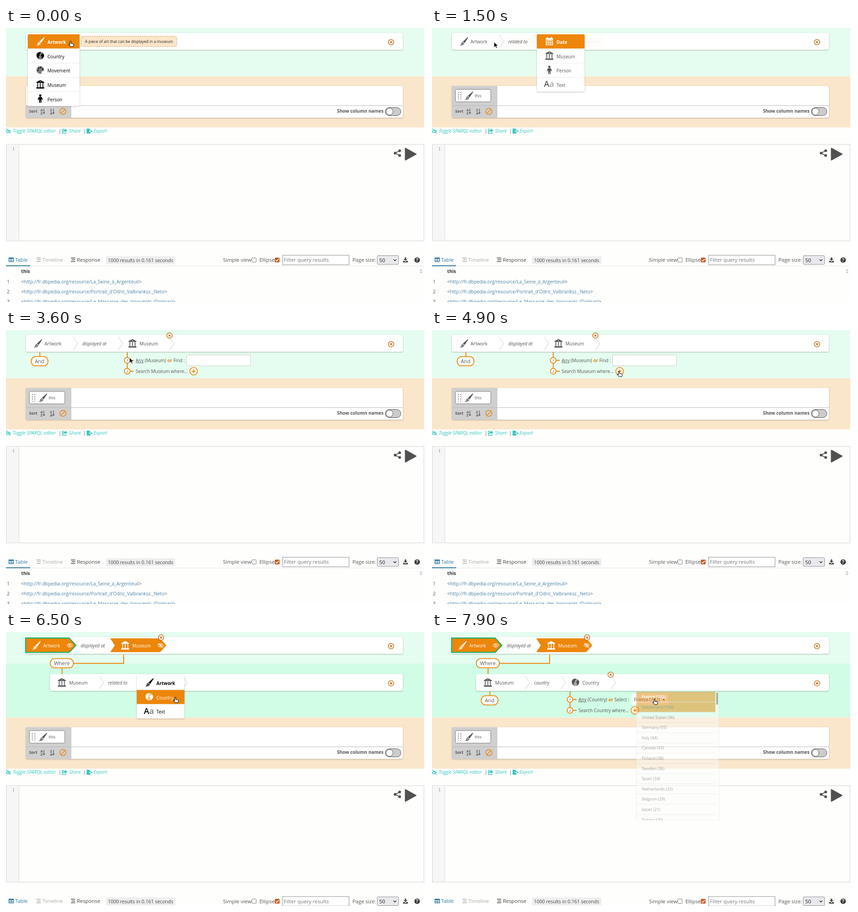
An HTML page that plays this animation: 925x605 px, repeating every 8 s.

```html
<!DOCTYPE html>
<html lang="en">
<head>
<meta charset="utf-8">
<title>Visual query builder</title>
<style>
html, body { margin: 0; width: 100%; height: 100%; overflow: hidden; background: #fefefd; }
svg { display: block; width: 925px; height: 605px; font-family: "Open Sans", sans-serif; }
.card { fill: #fff; filter: drop-shadow(0 1px 1.5px #0004); }
.mono { font-family: "DejaVu Sans Mono", monospace; }
</style>
</head>
<body>
<svg id="stage" viewBox="0 0 925 605"></svg>
<script>
const LOOP = 8000, STEP = 100;
const ORANGE = '#ed860b', GREEN = '#1fb36c', GRAY = '#555';

const text = (x, y, s, size = 10, fill = GRAY, extra = '') =>
  `<text x="${x}" y="${y}" font-size="${size}" fill="${fill}" ${extra}>${s}</text>`;
const bold = 'font-weight="700"', italic = 'font-style="italic"';
const rect = (x, y, w, h, fill, extra = '') =>
  `<rect x="${x}" y="${y}" width="${w}" height="${h}" fill="${fill}" ${extra}/>`;
const path = (d, fill, extra = '') => `<path d="${d}" fill="${fill}" ${extra}/>`;
const line = (d, color, width = 1) => path(d, 'none', `stroke="${color}" stroke-width="${width}"`);
const circle = (x, y, r, fill, extra = '') => `<circle cx="${x}" cy="${y}" r="${r}" fill="${fill}" ${extra}/>`;
const stroke = (color, width = 1) => `stroke="${color}" stroke-width="${width}"`;
const group = (x, y, body, extra = '') => `<g transform="translate(${x} ${y})" ${extra}>${body}</g>`;
const fade = (opacity, body) => opacity > 0 ? `<g opacity="${opacity}">${body}</g>` : '';
const card = (x, y, w, h) => rect(x, y, w, h, '#fff', 'class="card" rx="3"');

// Two-tone icons, centred on the origin
const icons = {
  brush: c => path('M9 -9.5L9.5 -8 2 3.5 -2 .5Z', c) +
    path('M-3 1L1.5 4.3C1 8 -4 9.8 -9 9 -5 7.5 -7 3 -3 1Z', c, 'opacity=".7"'),
  museum: c => path('M0 -9.5L8.7 -5V-3.5H-8.7V-5ZM-8.7 6.5H8.7V9.3H-8.7Z', c) +
    path('M-7 -3.5h2.6V6.5h-2.6ZM-1.3 -3.5h2.6V6.5h-2.6ZM4.4 -3.5h2.6V6.5h-2.6Z', c, 'opacity=".7"') +
    circle(0, -6, 1, '#fff'),
  person: c => circle(0, -7, 2.5, c) +
    path('M-5 0Q-4 -4.3 0 -4.3 4 -4.3 5 0L5.5 2.2 4 2.8 2.6 0V9H.5V4H-.5V9H-2.6V0L-4 2.8 -5.5 2.2Z', c),
  calendar: c => path('M-8 -7H-5.5V-9.5H-3.5V-7H3.5V-9.5H5.5V-7H8V-3H-8Z', c) +
    path('M-8 -2H8V9H-8ZM-5.5 0v2.4h2.6V0ZM-1.3 0v2.4h2.6V0ZM3 0v2.4h2.6V0ZM-5.5 4.5v2.4h2.6V4.5ZM-1.3 4.5v2.4h2.6V4.5ZM3 4.5v2.4h2.6V4.5Z',
      c, 'fill-rule="evenodd" opacity=".75"'),
  globe: c => circle(0, 0, 8.6, c, 'opacity=".5"') +
    path('M-7.5 -4Q-5 -8 0 -8L1 -5 -2 -3 -1 0 -4 1 -3 5 -5 6Q-9 1 -7.5 -4ZM2 -2L5 -5 8 -2 8 2 5 6 3 7 3 2 1 0Z', c),
  palette: c => path('M8.5 0C9 4 3 1 3 4.5 3 7 3 9 0 8.5A8.5 8.5 0 1 1 8.5 0Z', c, 'opacity=".5"') +
    [[-5, 1], [-3.5, -4], [1, -5.5], [5, -2]].map(([x, y]) => circle(x, y, 1.5, c)).join(''),
  letters: c => text(-12, 6, 'A', 18, c, 'font-weight="600"') + text(0, 6, 'a', 18, c, 'font-weight="600" opacity=".5"'),
};
const icon = (name, x, y, color = GRAY) => group(x, y, icons[name](color));

const closeMark = (x, y) => circle(x, y, 6, '#fff6e8', stroke('#b96a17', 1.3)) +
  line(`M${x - 2} ${y - 2}l4 4m0 -4l-4 4`, '#b96a17', 1.5);
const chevron = (x, y) => line(`M${x} ${y - 15}l10 15l-10 14`, '#dedede', 1.3);
const pill = (x, y, w, label) => rect(x, y, w, 20.5, '#fff', `rx="10" ${stroke(ORANGE, 1.8)}`) +
  text(x + w / 2, y + 14.2, label, 11.4, GRAY, 'text-anchor="middle"');
const plus = (x, y) => circle(x, y, 8.5, '#fff3e2', stroke(ORANGE, 1.6)) +
  line(`M${x - 3.5} ${y}h7m-3.5 -3.5v7`, ORANGE, 1.8);
const mixGray = (from, to, k) => { const v = Math.round(from + (to - from) * k); return `rgb(${v},${v},${v})`; };

function menu(x, y, w, items, heat, awake) {
  const pitch = 31.7, base = awake ? 0 : 85;
  return card(x, y, w, pitch * items.length) + items.map(([name, label], i) => {
    const h = heat[i] || 0, top = y + i * pitch, color = mixGray(base, 255, h);
    return rect(x, top, w, pitch, ORANGE, `opacity="${h}"`) +
      (i ? line(`M${x} ${top}h${w}`, '#e8e8e8') : '') +
      icon(name, x + 27.5, top + 15.3, color) +
      text(x + 43.3, top + 20.8, label, 10, color, i ? '' : bold);
  }).join('');
}

function steps(x, y, noun, action, plusX) {
  const mark = (cy, n) => circle(x, cy, 6.3, '#fff', stroke(ORANGE, 1.8)) +
    text(x, cy + 3, n, 8, GRAY, `text-anchor="middle" ${italic}`) + line(`M${x + 7} ${cy}h7.5`, ORANGE, 2);
  return line(`M${x} ${y - 18}V${y + 24}`, ORANGE, 2) + mark(y, 1) + mark(y + 24, 2) +
    text(x + 18.5, y + 3.8, `<tspan text-decoration="underline">Any</tspan> (${noun}) <tspan font-weight="700" fill="${ORANGE}">or</tspan> ${action} :`) +
    text(x + 18.5, y + 27.8, `Search ${noun} where...`) + plus(plusX, y + 24);
}

function sortIcon(x, first, second) {
  return text(x, 183.5, first, 7.5, GRAY, bold) + text(x, 190.5, second, 7.5, GRAY, bold) +
    line(`M${x + 7.5} 178v11m-2 -2.3l2 2.3l2 -2.3`, GRAY, 1.2);
}

function columns(withThis) {
  let s = card(44, 128, 830, 70);
  if (withThis) s += rect(44, 128, 100, 43, '#cfcfcf');
  s += rect(44, 171, 100, 27, '#cfcfcf') + line('M44 171.3H874', '#b8b8b8');
  if (withThis) s += rect(51.5, 135.5, 78, 27.5, '#fff', `rx="3" ${stroke('#777')}`) +
    line('M58 141v17M63.5 141v17', '#888', 1.6).replace('/>', ' stroke-dasharray="3 2"/>') +
    group(81, 149.5, icons.brush(GRAY), '') + text(94, 152.5, 'this', 8.8);
  return s + text(51, 187, 'Sort', 8.8, GRAY, bold) + sortIcon(76, 'A', 'Z') + sortIcon(97, 'Z', 'A') +
    circle(125.3, 184, 6.8, 'none', stroke(ORANGE, 1.5)) + line('M120.5 188.8l9.6 -9.6', ORANGE, 1.5) +
    text(729, 187, 'Show column names', 10, GRAY, bold) +
    rect(835.2, 175.5, 34.5, 18, '#cbcbcb', `rx="9" ${stroke(GRAY)}`) + circle(844.7, 184.5, 7.6, '#fff', stroke(GRAY));
}

function links() {
  const c = '#35c9bd', link = (x, s) => text(x, 231, s, 10.3, c, italic);
  return line('M0 229Q5 222 10 228M0 229Q5 233 10 228M1 222L10 233', c, 1.4) +
    link(15, 'Toggle SPARQL editor') + text(116, 231, '|', 10.3) +
    path('M130 222l5 4.3l-5 4.2v-2.6q-4 -.2 -4.5 3q-1.5 -6 4.5 -6.4Z', c) +
    line('M128 223.5h-4v9h8v-2', c, 1.4) + link(139, 'Share') + text(170, 231, '|', 10.3) +
    path('M177.5 222h5.5l3 3v8h-8.5ZM183 227v2h6l-2 2 4 -3 -4 -3 1 2Z', c) + link(193, 'Export');
}

function editor() {
  const dark = '#505050';
  return rect(.5, 257, 920, 213, '#fefefd', stroke('#d2d2d2')) + rect(1, 257.5, 27, 212, '#f6f6f6') +
    line('M28.5 257V470', '#ddd') + text(13.5, 270, '1', 9.3, '#999', 'class="mono"') +
    line('M867 271L857 276.3L867 281.5', dark, 1.8) +
    [[857, 276.3], [867, 271], [867, 281.5]].map(([x, y]) => circle(x, y, 3, dark)).join('') +
    path('M879.5 265.5V291.5L903 278.5Z', dark, `${stroke(dark, 2)} stroke-linejoin="round"`);
}

function results() {
  const teal = '#337b9e', dark = '#444', root = 'http://fr.dbpedia.org/resource/';
  const bars = (x, c) => line(`M${x} 507.7h9.5M${x + 1.5} 511.6h8M${x} 515.5h9.5`, c, 1.5);
  const rows = ['La_Seine_à_Argenteuil', "Portrait_d'Odric_Valbranksz._Neto", 'Le_Massacre_des_Innocents_(Dolmar)'];
  return line('M0 525.5H920', '#e6e6e6') + rect(0, 524, 53, 2, teal) +
    rect(6.5, 507.5, 10, 8.5, 'none', stroke(teal, 1.4)) + rect(6, 507, 11, 3, teal) + line('M11.5 508v8M6 513h11', teal, 1.2) +
    text(20, 516, 'Table', 11.4, teal) + bars(67, '#aaa') + text(80, 516, 'Timeline', 11.4, '#aaa') +
    bars(143, dark) + text(156, 516, 'Response', 11.4, dark) +
    rect(220, 504, 153, 17.5, '#eeeeee', 'rx="3"') + text(224.5, 516.5, '1000 results in 0.161 seconds', 10.5, dark) +
    text(478, 516.3, 'Simple view', 11.4) + rect(541.5, 507.5, 9.5, 9.5, '#fff', `rx="1.5" ${stroke('#777')}`) +
    text(558, 516.3, 'Ellipse', 11.4) + rect(592, 507, 10.5, 10.5, '#cb5c20', 'rx="1.5"') + line('M594.2 512.4l2.2 2.4l4.2 -5', '#fff', 1.5) +
    rect(609.5, 501.8, 146, 21, '#fff', stroke('#8b8b8b')) + text(612, 516.3, 'Filter query results', 11.4, '#757575') +
    text(763, 516.3, 'Page size:', 11.4) + rect(817.5, 502.5, 47, 19.5, '#e9e9ed', `rx="2" ${stroke('#909090')}`) +
    text(822, 516.5, '50', 11.4, '#222') + line('M853.5 511l3 3l3 -3', '#222', 1.5) +
    path('M878.3 506.5h3v3.5h2.8l-4.3 4 -4.3 -4h2.8ZM874.5 514h3l2.3 2 2.3 -2h3v3.5h-10.6Z', dark) +
    circle(905.5, 512.3, 6, '#3c3c3c') + text(905.5, 516, '?', 10, '#fff', `${bold} text-anchor="middle"`) +
    text(33.5, 541, 'this', 10.25, '#333', bold) +
    path('M911 536l3 -4 3 4ZM911 538l3 4 3 -4Z', '#c4c4c4') +
    rows.map((r, i) => text(2, 564 + i * 22, i + 1, 10.25) +
      text(33.5, 564 + i * 22, `&lt;<tspan fill="#4a83a8">${root}${r}</tspan>&gt;`, 10.25)).join('');
}

const lower = withThis => columns(withThis) + links() + editor() + results();
const lowerEmpty = lower(false), lowerFull = lower(true);

function chips(a) {
  const dx = -1.6 * (1 - a), label = a < .5 ? '#8f8273' : '#fff', pale = 1 - a;
  const eye = (x, slashed) => line(`M${x - 6} 29.5q6 -8 12 0q-6 8 -12 0${slashed ? `M${x - 5} 24.5l10 10` : ''}`, '#fff', 1.1) +
    circle(x, 29.5, 1.9, 'none', stroke('#fff', 1.1));
  return group(dx, 0,
    path('M43.3 13.2H139L154 29.5L139 45H43.3Z', ORANGE, stroke(GREEN, 2.4)) +
    rect(43.5, 13, 94, 32, '#f9dfbf', `opacity="${pale}"`) +
    icon('brush', 66.5, 29.5, label) + text(82, 33.5, 'Artwork', 10, label) + eye(140.5) +
    text(164.5, 33.5, 'displayed at', 10, GRAY, italic) +
    path('M229.5 14H339.5L353 29.5L339.5 44.5H229.5L239.5 29.5Z', ORANGE) +
    rect(240, 14, 97, 30.5, '#f9dfbf', `opacity="${pale}"`) +
    icon('museum', 262.5, 29.5, label) + text(278, 33.5, 'Museum', 10, label) + eye(340.5, true) + closeMark(341.5, 12.2));
}

const firstMenu = () => menu(48, 14, 114, [['brush', 'Artwork'], ['globe', 'Country'], ['palette', 'Movement'], ['museum', 'Museum'], ['person', 'Person']], [1], true);
const tooltip = () => rect(165.5, 18, 210.5, 23, '#fbe6ca', `rx="4" ${stroke('#d69a55')} stroke-dasharray="3 2"`) +
  text(174, 32.8, 'A piece of art that can be displayed in a museum', 8.57, '#222');

function countryList() {
  const data = ['France (722)', 'Switzerland (146)', 'United States (96)', 'Germany (55)', 'Italy (44)', 'Canada (43)', 'Finland (38)',
    'Sweden (36)', 'Spain (34)', 'Netherlands (33)', 'Belgium (29)', 'Japan (21)', 'Tunisia (20)'];
  return `<clipPath id="list"><rect x="449" y="131" width="184" height="284.5"/></clipPath><g clip-path="url(#list)">` +
    rect(450, 132, 182, 283, '#fcfcfa', stroke('#ddd')) + rect(450, 132, 174, 45, ORANGE) +
    rect(626, 134, 4, 26, '#666') +
    data.map((s, i) => line(`M450 ${154.4 + i * 22.6}h174`, '#ddd') +
      text(462, 146.4 + i * 22.6, s, 8.8, i ? '#444' : '#fff', i ? '' : bold)).join('') + '</g>';
}

function cursorAt(t) {
  const keys = [[0, 142, 29], [100, 142, 29], [700, 138, 34], [900, 138, 34], [1000, 136.5, 31], [2000, 136.5, 31], [2200, 176, 26],
    [2400, 218, 33], [2500, 218, 33], [2800, 248, 41], [3000, 274.5, 50], [3300, 272, 61], [4000, 272, 61], [4100, 279, 61], [4200, 279, 61],
    [4900, 412, 91], [5400, 412, 91], [5500, 411.5, 93], [5800, 411.5, 93], [6300, 385, 143], [6400, 385, 143], [6500, 373, 144],
    [7200, 373, 144], [7700, 490, 148], [LOOP, 490, 148]];
  const i = keys.findIndex(k => k[0] > t), [t0, x0, y0] = keys[i - 1], [t1, x1, y1] = keys[i];
  const k = (t - t0) / (t1 - t0);
  return [x0 + (x1 - x0) * k, y0 + (y1 - y0) * k];
}
const hand = path('M-1.2 1Q0 -.8 1.2 1V5L6 6Q7.5 6.5 7 9L6 12H0L-4 7.4Q-3.4 5.6 -1.2 7.4Z', '#fff', `${stroke('#111', 1.1)} stroke-linejoin="round"`);
const arrow = path('M0 0V12L3 9.2 5 13.5 7 12.6 5.2 8.6H9Z', '#111', stroke('#fff', .8));

function scene(t) {
  const [cx, cy] = cursorAt(t), nested = t >= 5500;
  const pointing = t < 1300 || (t >= 2600 && t < 3600 && cx > 231) || (t >= 4700 && t < 5500) ||
    (t >= 5900 && t < 6800 && cx < 394) || (t >= 7300 && cx > 439);
  let s = rect(0, 0, 921, nested ? 69.5 : 106.5, '#e5fdf0');
  if (nested) s += rect(0, 69.5, 921, 119, '#d1fce5');
  s += group(0, nested ? 82.3 : 0, rect(0, 106.5, 921, 113, '#fae6ca') + (t < 1300 ? lowerEmpty : lowerFull));
  s += card(44, 11, 830, 37) + closeMark(848, 31.3);

  if (!nested && t >= 1300) s += icon('brush', 70, 29.5) + text(85, 33.5, 'Artwork') + chevron(148, 30);
  if (t < 1600) {
    const left = t < 1300 ? 1 : [.4, .2, .06][(t - 1300) / STEP];
    s += fade(left, tooltip()) + fade(t < 1300 ? 1 : t < 1400 ? .5 : 0, firstMenu());
  }
  if (t >= 1300 && t < 3600) {
    const heat = t < 2900 ? [1, 0] : t < 3000 ? [.85, .15] : t < 3100 ? [.55, .55] : [0, 1];
    s += text(168, 33.5, 'related to', 10, GRAY, italic) + fade(t < 1400 ? 0 : t < 1500 ? .5 : 1,
      menu(231, 14, 105, [['calendar', 'Date'], ['museum', 'Museum'], ['person', 'Person'], ['letters', 'Text']], heat, t >= 2600 && cx > 231));
  } else if (t >= 3600 && !nested) {
    s += text(168, 33.5, 'displayed at', 10, GRAY, italic) + chevron(247, 30) + icon('museum', 278.5, 29.5) +
      text(294, 33.5, 'Museum') + chevron(360, 30) + closeMark(360, 12.2) +
      line('M74.5 49V59', ORANGE, 2) + pill(55.5, 58.7, 37, 'And') +
      rect(397.5, 55, 141, 24, '#fff', `rx="3" ${stroke('#ccc')}`) + steps(267, 67, 'Museum', 'Find', 413.3);
  } else if (nested) {
    s += chips(t < 5600 ? 0 : t < 5900 ? .9 : 1) +
      line('M259 50V69.3H149M123.5 80V93', ORANGE, 2) + pill(97.5, 58.7, 51, 'Where') +
      card(97, 93, 777, 37) + closeMark(848, 113.4) + icon('museum', 123, 111.5) + text(139, 115.5, 'Museum') + chevron(205, 112);
    if (t < 6800) {
      const onCountry = t >= 6200;
      s += text(225, 115.5, 'related to', 10, GRAY, italic) + chevron(389, 112) +
        menu(288, 96, 105, [['brush', 'Artwork'], ['globe', 'Country'], ['letters', 'Text']], onCountry ? [0, 1] : [1], onCountry);
    } else {
      s += text(225, 115.5, 'country', 10, GRAY, italic) + chevron(284, 112) + icon('globe', 316, 111) + text(331, 115.5, 'Country') +
        chevron(394, 112) + closeMark(393.5, 94.3) + line('M127.5 131V141', ORANGE, 2) + pill(108.5, 140.7, 37, 'And') +
        steps(304, 149, 'Country', 'Select', 446.8) + rect(439, 136, 81.5, 24.5, '#fff', 'rx="4" opacity=".8"') +
        text(445, 152.6, 'France (722)') + path('M508 151h5l-2.5 -4Z', GRAY) +
        fade(t < 7700 ? 0 : [.15, .32, .48][(t - 7700) / STEP], countryList());
    }
  }
  return s + group(cx, cy, pointing ? hand : arrow);
}

const stage = document.getElementById('stage');
let shown = -1;
function tick() {
  const t = Math.floor(performance.now() % LOOP / STEP) * STEP;
  if (t !== shown) stage.innerHTML = scene(shown = t);
  requestAnimationFrame(tick);
}
tick();
</script>
</body>
</html>
```
